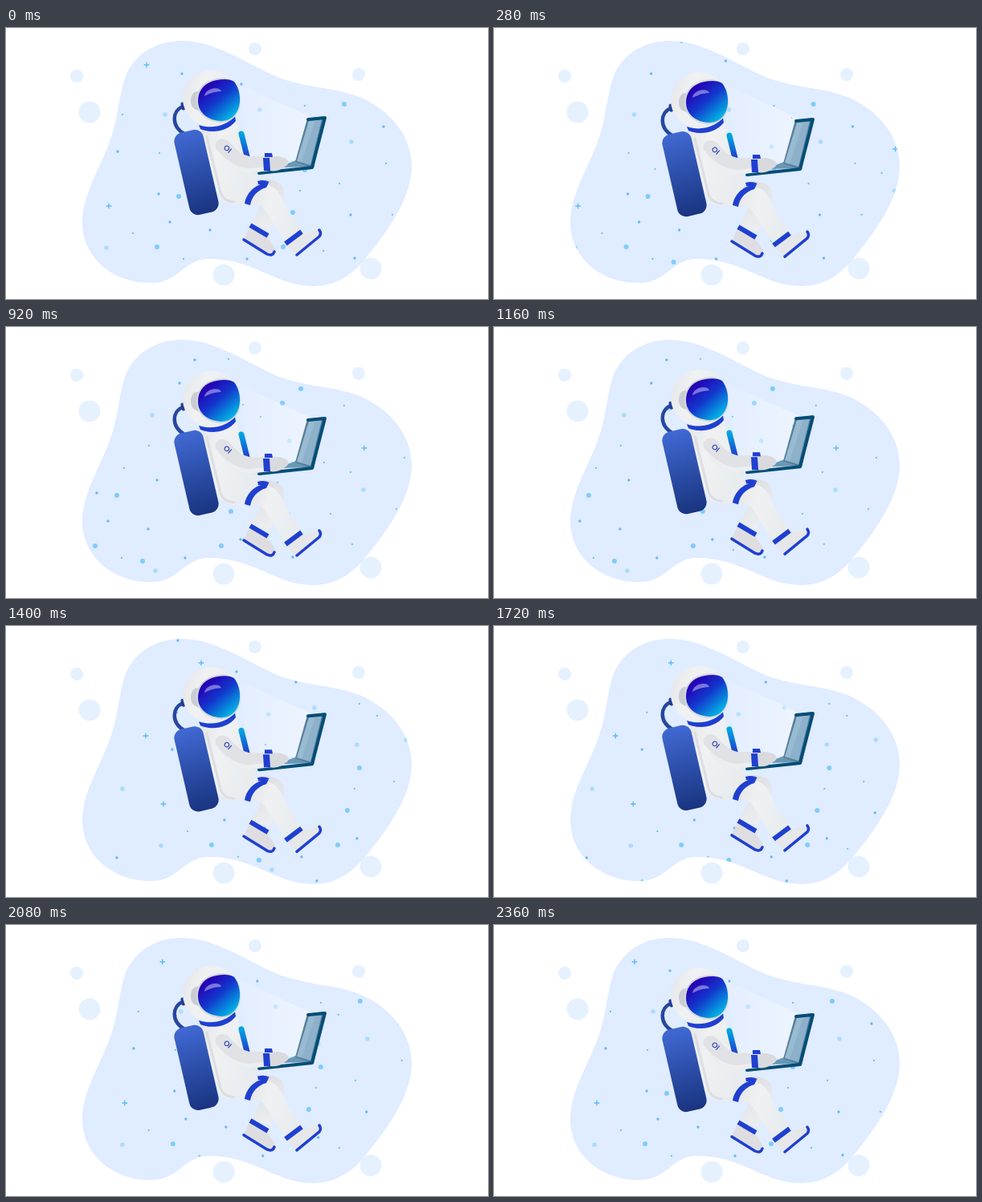
Write an HTML page that moves like this. It is 600x338 px and loops after 2.4 s.

```html
<!DOCTYPE html>
<html lang="en">
<head>
<meta charset="utf-8">
<title>Floating astronaut</title>
<style>
  html, body { margin: 0; height: 100%; overflow: hidden; background: #fff; }
  svg { display: block; width: 600px; height: 338px; }
  .line { fill: none; stroke-linecap: round; stroke-linejoin: round; }
  .blue { stroke: #1f3fd0; }
</style>
</head>
<body>
<svg viewBox="0 0 600 338">
  <defs>
    <path id="blob" d="M219 16C262 16 300 45 340 62C380 76 405 73 440 86C482 104 505 138 505 172C505 212 476 252 450 284C432 308 410 322 383 322C335 322 310 288 253 288C220 288 217 318 180 318C128 318 95 282 95 243C95 200 126 165 136 118C143 88 144 60 158 44C173 25 195 16 219 16Z"/>
    <clipPath id="inside"><use href="#blob"/></clipPath>
    <linearGradient id="visor" x1=".2" y1=".15" x2=".85" y2=".9">
      <stop stop-color="#2600b4"/><stop offset=".45" stop-color="#1238cc"/><stop offset="1" stop-color="#00b9e6"/>
    </linearGradient>
    <linearGradient id="tank" x2="0" y2="1">
      <stop stop-color="#4069d3"/><stop offset="1" stop-color="#193480"/>
    </linearGradient>
    <linearGradient id="suit" x1="0" x2="1" y2=".3">
      <stop stop-color="#e4e5e8"/><stop offset=".4" stop-color="#f0f1f3"/><stop offset="1" stop-color="#e8ecee"/>
    </linearGradient>
    <linearGradient id="limb" x2=".4" y2="1">
      <stop stop-color="#dcdce0"/><stop offset="1" stop-color="#eceef0"/>
    </linearGradient>
    <linearGradient id="strap" x2="0" y2="1">
      <stop stop-color="#00a5e0"/><stop offset="1" stop-color="#1f3fd0"/>
    </linearGradient>
    <linearGradient id="beam">
      <stop stop-color="#fff" stop-opacity=".1"/><stop offset="1" stop-color="#fff" stop-opacity=".45"/>
    </linearGradient>
  </defs>

  <g fill="#e5f1ff">
    <circle cx="88" cy="60" r="8"/><circle cx="104" cy="105" r="13.5"/>
    <circle cx="310" cy="26" r="8"/><circle cx="439" cy="58" r="8"/>
    <circle cx="271" cy="308" r="13.5"/><circle cx="454" cy="300" r="13.5"/>
  </g>
  <use href="#blob" fill="#e0ecff"/>
  <g clip-path="url(#inside)"><g id="stars" class="line"></g></g>

  <g id="astronaut">
    <path fill="url(#beam)" d="M290 70L380 111L362 166L301 160Z"/>

    <!-- far leg -->
    <path fill="url(#limb)" d="M308 191C326 186 346 191 346 205C345 221 336 235 328 252L306 243C312 232 317 225 318 215Z"/>
    <path fill="#1f3fd0" d="M308 194C314 189 322 189 328 192L321 196Z"/>
    <path fill="#dedee2" d="M303 248L325 260C329 269 338 274 334 280L328 283L296 264Z"/>
    <path class="line blue" stroke-width="3.5" d="M296 264L325 282Q332 285 334 279"/>
    <path class="line blue" stroke-width="6" stroke-linecap="butt" style="stroke-linecap:butt" d="M304 246L326 259"/>

    <!-- torso -->
    <path fill="url(#suit)" d="M240 121C258 130 274 127 286 114L300 160L314 194C306 201 302 209 299 219Q284 222 272 217Q265 214 262 203L243 130Z"/>
    <path class="line" stroke="#dcdee2" stroke-width="3" d="M250 136L267 205Q270 216 284 217"/>

    <!-- near leg -->
    <path fill="url(#suit)" d="M304 221C306 209 314 201 325 196C339 198 345 214 352 229L369 254L350 271L323 228Q316 217 304 221Z"/>
    <path fill="#1f3fd0" d="M297 219C300 204 311 194 327 193L324 199C313 202 306 210 304 221Z"/>
    <path fill="#e6e7ea" d="M350 272L369 257L384 253Q393 249 391 256L362 283Z"/>
    <path class="line blue" stroke-width="3.5" d="M362 283L390 260Q393 256 390 252"/>
    <path class="line blue" stroke-width="6" style="stroke-linecap:butt" d="M348 269L368 254"/>

    <!-- hose and tank -->
    <path class="line" stroke="#27479f" stroke-width="4.5" d="M220 98C207 103 205 122 222 132"/>
    <path class="line" stroke="#213f94" stroke-width="5" d="M220 95L221 100"/>
    <rect x="-18.5" y="-52.5" width="37" height="105" rx="11" fill="url(#tank)" transform="translate(237 180) rotate(-13)"/>

    <!-- helmet -->
    <ellipse cx="256" cy="88" rx="36" ry="35" fill="url(#suit)"/>
    <path fill="#1f3fd0" d="M240 121C256 126 273 123 285 110L286 116C276 129 256 132 242 126Z"/>
    <path fill="#c9cdd3" d="M241 79C233 78 230 84 230 91S234 103 242 103Z"/>
    <path fill="#d3d8df" d="M237 91C237 73 251 62 272 62L284 66C297 82 296 116 268 118C249 117 237 106 237 91Z"/>
    <path fill="url(#visor)" d="M239 91C239 74 252 64 272 64Q280 64 284 67C296 82 294 115 268 116C250 115 239 105 239 91Z"/>
    <path fill="#b9b4f5" opacity=".6" d="M247 85C248 75 266 72 268 79C262 79 254 81 247 85Z"/>

    <!-- laptop -->
    <path fill="#6998b5" d="M338 174L361 165L381 173Z"/>
    <path fill="#557f9b" d="M375 113L397 110L383 175L360 167Z"/>
    <path fill="#8db1cb" d="M377 116L393 114L379 171L362 166Z"/>
    <path fill="#a5c3d7" opacity=".55" d="M377 116L385 115L368 167L362 166Z"/>
    <path class="line" stroke="#054d76" stroke-width="4" d="M376 114L397 112L381 174L315 181"/>

    <!-- arm -->
    <path class="line" stroke="url(#strap)" stroke-width="7" d="M293 132L300 160"/>
    <path fill="#e1e2e5" d="M261 150C258 138 272 134 279 143Q291 158 303 160L329 160V178L303 181Q289 181 279 172Z"/>
    <path fill="#eceef0" d="M264 153C272 162 284 174 303 175L321 173V178L303 181Q289 181 279 172Z"/>
    <path fill="#d9dade" d="M329 161Q341 158 350 164Q354 170 347 173Q339 180 328 178Z"/>
    <path fill="#1f3fd0" d="M322 156H331L332 161H322ZM320 162H328L329 178H321Z"/>
    <text x="270" y="150" transform="rotate(40 270 150)" fill="#2a43b8" font-family="Lato, sans-serif" font-size="9" font-weight="700">OI</text>
  </g>
</svg>
<script>
const FRAME = 40, FRAMES = 60, LAST = FRAMES - 1;
const stars = document.getElementById('stars');
const astronaut = document.getElementById('astronaut');

// Draws one mark per "x y" pair, all in a single stroked path.
function scatter(points, color, width, mark = 'h0') {
  const path = document.createElementNS('http://www.w3.org/2000/svg', 'path');
  path.setAttribute('d', points.split(',').map(p => `M${p}${mark}`).join(''));
  path.setAttribute('stroke', color);
  path.setAttribute('stroke-width', width);
  stars.append(path);
}

scatter('316 102,198 108,430 142,125 274,259 110,369 148,522 203,263 304,77 203', '#a9dcfb', 5.4);
scatter('421 95,215 210,188 273,357 230,345 273,372 177,444 77,247 292', '#80ccfa', 6);
scatter('219 57,293 70,470 123,139 154,190 207,204 242,254 252,434 287,300 288,312 41,429 233,369 265,265 191,70 289,146 18,319 318,139 318', '#62baf3', 3.3);
scatter('372 97,145 108,191 156,473 169,415 194,366 203,158 256,221 288,395 278,481 233,394 112,506 181,354 40,255 148,498 98,224 176,573 163,508 271,563 227,257 18', '#70c6f6', 2.3);
scatter('175 46,128 222,523 151,106 137', '#5cbcf5', 1.4, 'm-2.8 0h5.6m-2.8 -2.8v5.6');

function draw(now) {
  const step = Math.floor(now / FRAME) % FRAMES;
  // The star field drifts left and jumps back halfway through the loop.
  const drift = step < FRAMES / 2 ? -3.35 * step : 2.83 * (LAST - step);
  const bob = 3.1 * Math.sin(2 * Math.PI * step / LAST);
  stars.setAttribute('transform', `translate(${drift} 0)`);
  astronaut.setAttribute('transform', `translate(0 ${bob})`);
}

const start = performance.now();
function tick() {
  draw(performance.now() - start);
  requestAnimationFrame(tick);
}
tick();
</script>
</body>
</html>
```
